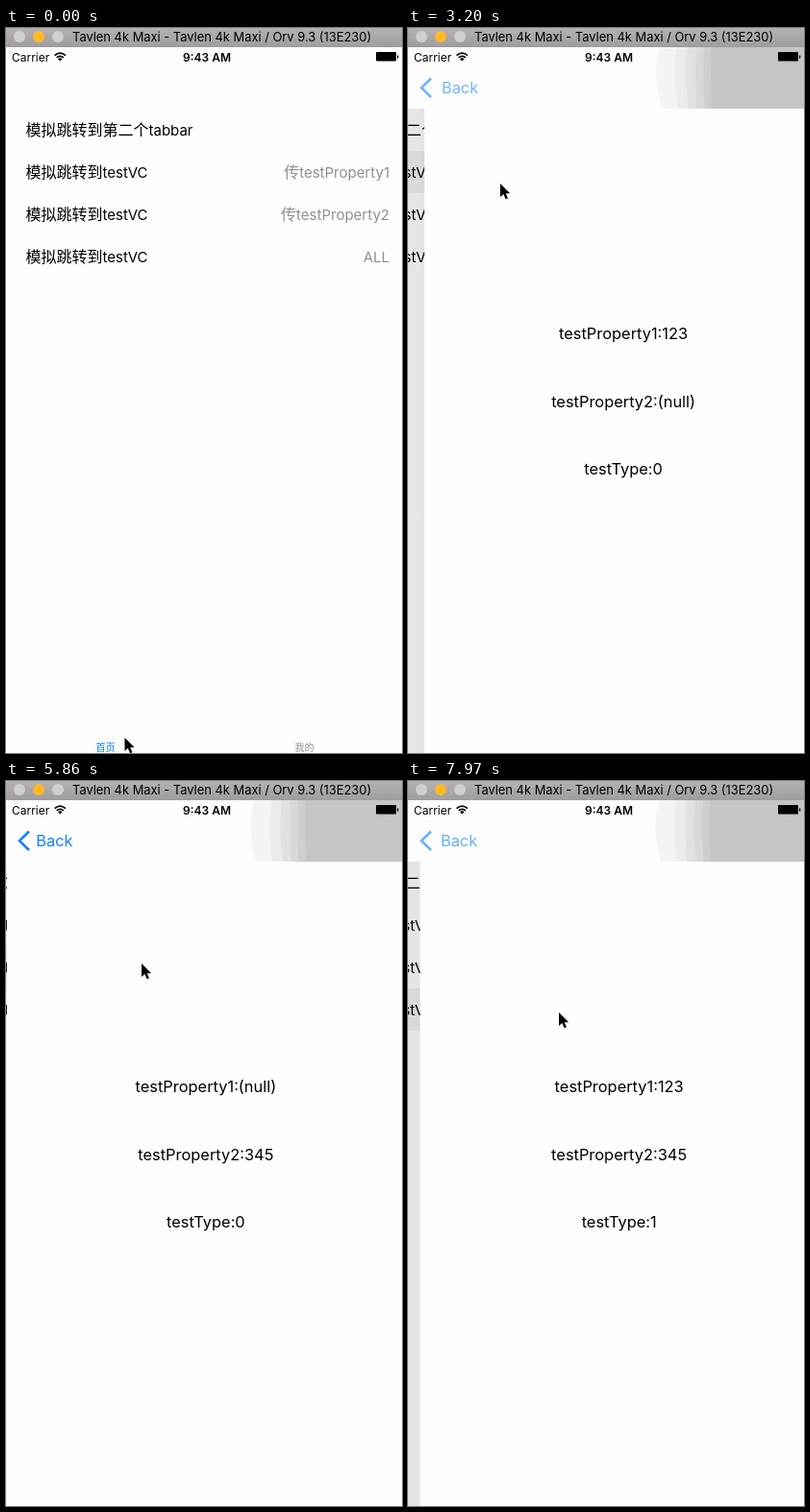
Animation of 412x755 px, one loop 8 s. Source, as an HTML page:

```html
<!DOCTYPE html>
<html lang="zh-CN">
<head>
<meta charset="utf-8">
<style>
  html, body { margin: 0; width: 100%; height: 100%; overflow: hidden; background: #fefefe; }
  svg { display: block; width: 412px; height: 755px; }
  text { font: 16.4px Inter, "Noto Sans CJK SC", "Noto Sans CJK", sans-serif; white-space: pre; }
  .row text { font-size: 15px; }
  .row tspan { font-size: 16px; }
  .detail { fill: #8e8e93; text-anchor: end; }
  .line { text-anchor: middle; }
  .tab { font-size: 10px; }
  .title { font-size: 12.9px; }
  .status { font-size: 12px; }
  .clock { font-weight: 600; text-anchor: middle; }
</style>
</head>
<body>
<svg viewBox="0 0 412 755">
  <defs>
    <linearGradient id="chrome" x2="0" y2="1">
      <stop stop-color="#b4b0b3"/><stop offset="1" stop-color="#9f9b9e"/>
    </linearGradient>
    <linearGradient id="edge">
      <stop stop-opacity="0"/><stop offset="1" stop-opacity=".25"/>
    </linearGradient>
  </defs>
  <rect width="412" height="755" fill="#fefefe"/>

  <g id="home">
    <rect id="selection" width="412" height="44" fill="#d8d8d8"/>
    <g id="rows"></g>
    <rect id="tabTint" y="707" width="412" height="48" opacity=".03"/>
    <text id="tab1" class="tab" x="93.5" y="752.5">首页</text>
    <text id="tab2" class="tab" x="300.5" y="752.5">我的</text>
  </g>
  <rect id="dim" y="84" width="412" height="671"/>

  <g id="page">
    <rect id="shadow" x="-8" y="84" width="8" height="671" fill="url(#edge)"/>
    <rect y="84" width="412" height="671" fill="#fefefe"/>
    <g id="lines"></g>
  </g>

  <g id="nav">
    <rect y="20" width="412" height="64" fill="#fdfdfd"/>
    <g id="bands"></g>
    <path id="chevron" d="M24 52.5 14 62.3 24 72" fill="none" stroke="#007aff" stroke-width="2.6"/>
    <text id="back" x="31" y="68" fill="#007aff">Back</text>
  </g>

  <rect width="412" height="20" fill="url(#chrome)"/>
  <g fill="#d1ced1">
    <circle cx="14" cy="9" r="6"/>
    <circle cx="34" cy="9" r="6" fill="#fdba25"/>
    <circle cx="54" cy="9" r="6"/>
  </g>
  <text class="title" x="69" y="14">Tavlen 4k Maxi - Tavlen 4k Maxi / Orv 9.3 (13E230)</text>
  <text class="status" x="6" y="35">Carrier</text>
  <path d="M50.6 28.6Q56.3 23.6 62 28.6M52.7 30.9Q56.3 27.7 59.9 30.9" fill="none" stroke="#000" stroke-width="1.7"/>
  <path d="M54 32.2Q56.3 30.4 58.6 32.2L56.3 34.6Z"/>
  <text class="status clock" x="209" y="35">9:43 AM</text>
  <rect x="385" y="25" width="21" height="9.5" rx="1"/>
  <rect x="407" y="28.5" width="1.3" height="3"/>

  <path id="cursor" d="M0 0V14L3.3 11 5.6 16.3 8 15.3 5.7 10.2H10.2Z" stroke="#fff" paint-order="stroke" stroke-width="1.8"/>
</svg>
<script>
const $ = id => document.getElementById(id);
const WIDTH = 412, LOOP = 8000, SLIDE = 500, PRESS = 25;
const BLUE = '#0a7aff', GREY = '#929292';

const repeat = (n, draw) => Array.from({ length: n }, (_, i) => draw(i)).join('');
const sizeHan = s => s.replace(/[\u4e00-\u9fff]+/g, '<tspan>$&</tspan>');

const details = ['', '传testProperty1', '传testProperty2', 'ALL'];
$('rows').innerHTML = repeat(4, i => {
  const y = 112 + 44 * i, title = '模拟跳转到' + (i ? 'testVC' : '第二个tabbar');
  return `<g class="row"><text x="20.5" y="${y}">${sizeHan(title)}</text>` +
    `<text class="detail" x="399" y="${y}">${sizeHan(details[i])}</text></g>`;
});

$('lines').innerHTML = repeat(3, i => `<text class="line" x="207" y="${324 + 70.5 * i}"></text>`);
const pageLines = row => [
  'testProperty1:' + (row === 2 ? '(null)' : '123'),
  'testProperty2:' + (row === 1 ? '(null)' : '345'),
  'testType:' + (row === 3 ? 1 : 0),
];

// Grey steps that crowd together towards the right, the outermost one rounded
$('bands').innerHTML = repeat(6, i => {
  const x = 56 * (i / 5) ** 0.66, bulge = 5 / (i + 1), v = 244 - 9.4 * i;
  return `<path d="M600 20H${x + bulge / 2}Q${x - bulge} 50 ${x + bulge} 84H600Z" fill="rgb(${v},${v},${v})"/>`;
});

const visits = [
  { row: 1, tap: 2900, pop: 4456 },
  { row: 2, tap: 5370, pop: 6777 },
  { row: 3, tap: 7650, pop: Infinity },
];

// Pointer stops: leave time, arrival time, x, y
const moves = [
  [90, 230, 109, 741], [380, 870, 168, 101], [1130, 1510, 80, 662],
  [1600, 1860, 112, 738], [1950, 2630, 96, 162], [3730, 4400, 48, 79],
  [4560, 5130, 141, 190], [6060, 6700, 59, 69], [6880, 7290, 157, 241],
];

const clamp = f => Math.min(1, Math.max(0, f));
const easeOut = f => 1 - (1 - f) ** 2;

function pointerAt(t) {
  let x = 123.5, y = 739;
  for (const [from, to, toX, toY] of moves) {
    const f = easeOut(clamp((t - from) / (to - from)));
    x += (toX - x) * f;
    y += (toY - y) * f;
  }
  return [x, y];
}

// Critically damped spring: share of the way left after u ms
function remaining(u) {
  if (u <= 0) return 1;
  if (u >= SLIDE) return 0;
  const k = 0.018 * u;
  return (1 + k) * Math.exp(-k);
}

const show = (id, on) => { $(id).style.display = on ? '' : 'none'; };
const move = (id, x, y = 0) => $(id).setAttribute('transform', `translate(${x} ${y})`);
const fade = (id, a) => $(id).setAttribute('opacity', a);

function renderPage(t, visit, popping, p) {
  move('page', WIDTH * (1 - p));
  fade('shadow', popping ? 1 : 1 - p);
  const texts = pageLines(visit.row);
  [...$('lines').children].forEach((line, i) => { line.textContent = texts[i]; });
  show('bands', p < 1);
  move('bands', 355 - 100 * p);
  move('back', 95 * (1 - p));
  const fadeIn = clamp((t - visit.tap - PRESS) / SLIDE);
  const fadeOut = clamp(1 - (t - visit.pop) / 300);
  fade('back', popping ? 0.72 * fadeOut : fadeIn);
  fade('chevron', popping ? 0.15 * fadeOut : fadeIn);
}

function render(t) {
  const visit = visits.find(v => t >= v.tap && t < v.pop + SLIDE);
  const popping = !!visit && t >= visit.pop;
  const p = !visit ? 0 : popping ? remaining(t - visit.pop) : 1 - remaining(t - visit.tap - PRESS);
  const onSecondTab = t >= 1130 && t < 1890;
  const row = t >= 1070 && t < 1130 ? 0 : visit && !popping ? visit.row : -1;

  show('rows', !onSecondTab);
  $('tab1').setAttribute('fill', onSecondTab ? GREY : BLUE);
  $('tab2').setAttribute('fill', onSecondTab ? BLUE : GREY);
  show('selection', row >= 0);
  move('selection', 0, 84 + 44 * row);
  fade('selection', 1 - 0.65 * p);
  show('tabTint', popping);
  move('home', -0.3 * WIDTH * p);
  fade('dim', 0.1 * p);

  show('page', p > 0);
  show('nav', p > 0);
  if (p > 0) renderPage(t, visit, popping, p);
  move('cursor', ...pointerAt(t));
}

const start = performance.now();
function tick() {
  render((performance.now() - start) % LOOP);
  requestAnimationFrame(tick);
}
tick();
</script>
</body>
</html>
```
